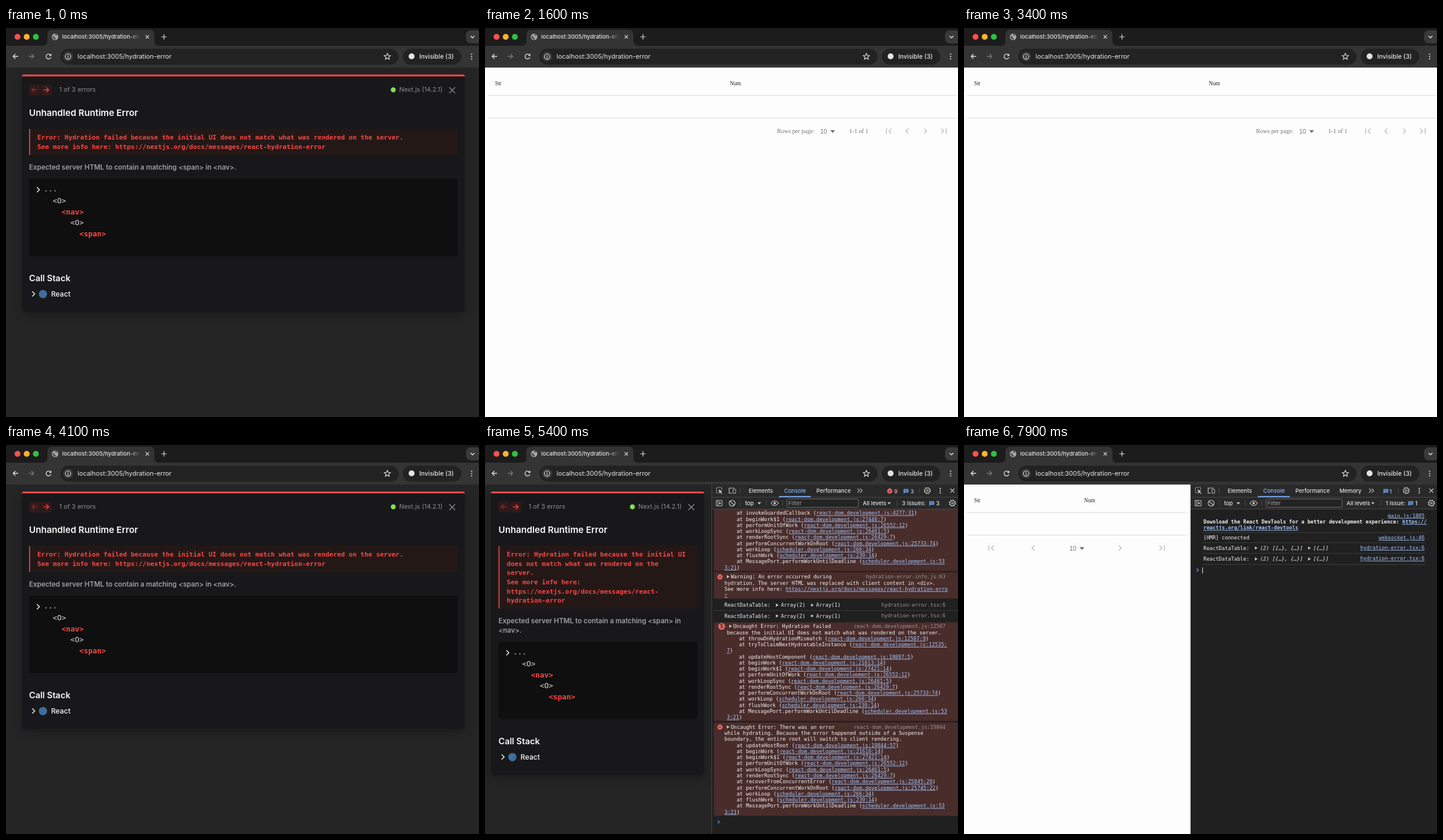
An HTML page for the animation above (8000 ms loop, 800 px wide and 659 px high).

```html
<!DOCTYPE html>
<html lang="en">
<head>
<meta charset="utf-8">
<title>Hydration error</title>
<style>
  html, body { margin: 0; width: 100%; height: 100%; overflow: hidden; background: #252526; }
  svg { display: block; width: 800px; height: 659px; }
  text { white-space: pre; font-family: Inter, Roboto, sans-serif; }
  .mono { font-family: "DejaVu Sans Mono", "Liberation Mono", monospace; }
  .serif { font-family: "Liberation Serif", "Noto Serif", serif; }
  .arial { font-family: "Liberation Sans", Inter, sans-serif; }
  .b { font-weight: 700; }
  .sb { font-weight: 600; }
  .md { font-weight: 500; }
  .i { font-style: italic; }
  .link { fill: #a6c6fa; text-decoration: underline; }
  .panel { filter: drop-shadow(0 5px 8px rgba(0, 0, 0, .28)); }
</style>
</head>
<body>
<svg id="stage" viewBox="0 0 800 659"></svg>
<script>
const LOOP = 8000, STEP = 100;
const RED = '#f94746', LIGHT = '#e3e3e3', PITCH = 10.27;

// Drawing helpers
const esc = s => s.replace(/</g, '&lt;').replace(/>/g, '&gt;');
const text = (x, y, s, size, fill, cls = '') =>
  `<text x="${x}" y="${y}" font-size="${size}" fill="${fill}" class="${cls}">${esc(s)}</text>`;
const rect = (x, y, w, h, fill, r = 0, extra = '') =>
  `<rect x="${x}" y="${y}" width="${w}" height="${h}" rx="${r}" fill="${fill}" ${extra}/>`;
const disc = (x, y, r, fill) => `<circle cx="${x}" cy="${y}" r="${r}" fill="${fill}"/>`;
const ring = (x, y, r, stroke, w = 1, extra = '') =>
  `<circle cx="${x}" cy="${y}" r="${r}" fill="none" stroke="${stroke}" stroke-width="${w}" ${extra}/>`;
const line = (d, stroke, w = 1, extra = '') =>
  `<path d="${d}" fill="none" stroke="${stroke}" stroke-width="${w}" ${extra}/>`;
const shape = (d, fill) => `<path d="${d}" fill="${fill}"/>`;
const group = (id, body) => `<g id="${id}">${body}</g>`;
const at = (x, y, body) => `<g transform="translate(${x} ${y})">${body}</g>`;
const cross = (x, y, r, stroke, w) =>
  line(`M${x - r} ${y - r}l${2 * r} ${2 * r}m0 ${-2 * r}l${-2 * r} ${2 * r}`, stroke, w);
const down = (x, y, fill, r = 3) => shape(`M${x - r} ${y - r / 2}h${2 * r}l${-r} ${r * 1.25}z`, fill);
const right = (x, y) => shape(`M${x - 2} ${y - 2.7}l4.6 2.7l-4.6 2.7z`, '#c4c4c4');
const dots = (x, y, gap) => [-gap, 0, gap].map(d => disc(x, y + d, 1.1, LIGHT)).join('');

// Browser frame
function browser() {
  const arrow = (x, s, c) => line(`M${x + 4.5 * s} 48H${x - 4 * s}m${4 * s} -4l${-4 * s} 4l${4 * s} 4`, c, 1.3);
  const star = Array.from({ length: 10 }, (_, i) => {
    const a = i * Math.PI / 5, r = i % 2 ? 2.5 : 5.6;
    return `${(645 + r * Math.sin(a)).toFixed(2)},${(48.5 - r * Math.cos(a)).toFixed(2)}`;
  }).join(' ');
  return rect(0, 0, 800, 31, '#1c1c1d') +
    shape('M62 30Q70 30 70 22V12Q70 3 79 3H243Q251 3 251 12V22Q251 30 259 30z', '#343435') +
    rect(0, 30, 800, 37, '#343435') +
    disc(19.5, 15, 5, '#f9504f') + disc(35, 15, 5, '#fcb32c') + disc(50.5, 15, 5, '#2fc142') +
    group('globe', disc(83, 15, 5.5, '#a6a8ab') +
      shape('M78.6 13l3 1.2l.6 2.3l2 .8l-.8 2.6q-4-1-4.8-6.9zM83 10.2l4 1.4l-1.6 1.5l-2.2-.6z', '#47484a')) +
    group('spinner', disc(83, 15, 3, '#8b8d91') + ring(83, 15, 5, '#58606d', 1.3) +
      group('arc', line('M83 10A5 5 0 0 1 88 15A5 5 0 0 1 83 20', '#8ab4f8', 1.4))) +
    text(95, 18.4, 'localhost:3005/hydration-error', 9.55, 'url(#tabFade)', 'md') +
    cross(239, 15, 2.8, '#dedede', 1.2) +
    line('M262.7 15h9M267.2 10.5v9', '#dedede', 1.2) +
    rect(778, 4, 26, 22, '#3a3a3b', 8) + line('M785.8 13.5l3.2 3.2l3.2-3.2', LIGHT, 1.4) +
    arrow(16, 1, LIGHT) + arrow(43, -1, '#77787a') +
    group('reload', line('M75.2 45.5A4.2 4.2 0 1 0 76 49.6', LIGHT, 1.3) + shape('M76.6 43.3v4h-4z', LIGHT)) +
    group('stop', cross(72, 48, 3.4, LIGHT, 1.3)) +
    rect(92, 35, 572, 27, '#222223', 13.5) + disc(105, 48.3, 8.5, '#373738') +
    ring(105, 48.3, 4.6, LIGHT, 1.1) + line('M105 47.7v3M105 45.5v1.2', LIGHT, 1.2) +
    text(121, 52.2, 'localhost:3005/hydration-error', 10.9, '#e8e8e8') +
    `<polygon points="${star}" fill="none" stroke="${LIGHT}" stroke-width="1.1"/>` +
    rect(671, 35, 99, 27, '#222223', 13.5) + disc(686, 48, 5, LIGHT) +
    text(699, 52, 'Invisible (3)', 10.5, '#e8e8e8', 'md') +
    dots(787.5, 48.3, 4);
}

// Runtime error panel; narrow when the dev tools are docked
function errorPanel(narrow) {
  const dx = narrow ? -16.2 : 0, dy = narrow ? 78 : 0, cut = narrow ? -405.7 : 0;
  const x = narrow ? 10 : 27, w = narrow ? 361 : 749;
  const bx = 39 + dx, bw = narrow ? 336 : 725;
  const message = narrow
    ? ['Error: Hydration failed because the initial UI', 'does not match what was rendered on the', 'server.',
       'See more info here:', 'https://nextjs.org/docs/messages/react-', 'hydration-error']
    : ['Error: Hydration failed because the initial UI does not match what was rendered on the server.',
       'See more info here: https://nextjs.org/docs/messages/react-hydration-error'];
  const hint = narrow
    ? ['Expected server HTML to contain a matching <span> in', '<nav>.']
    : ['Expected server HTML to contain a matching <span> in <nav>.'];
  const tree = ['<O>', '<nav>', '<O>', '<span>'];
  return rect(0, 67, narrow ? 383 : 800, 592, '#252526') +
    rect(x, 78.7, w, 402.5 + dy, '#18181a', 5, 'class="panel"') +
    shape(`M${x} 81.9Q${x} 78.7 ${x + 4} 78.7H${x + w - 4}Q${x + w} 78.7 ${x + w} 81.9z`, RED) +
    at(dx, 0,
      rect(39, 96, 18.6, 18, '#321a1b', 3) + rect(58.4, 96, 18.6, 18, '#321a1b', 3) +
      line('M52.5 104.7h-8.5m3.8 -4l-4 4l4 4', '#8c2f31', 1.2) +
      line('M63.5 104.7h8.5m-3.8 -4l4 4l-4 4', '#ff4a4a', 1.3) +
      text(90, 108.4, '1 of 3 errors', 10.9, '#8e8e92') +
      text(39, 148.8, 'Unhandled Runtime Error', 15.2, '#fafafa', 'sb')) +
    at(cut, 0, disc(655, 104.7, 4.2, '#83e053') +
      text(665, 108.4, 'Next.js (14.2.1)', 10.8, '#8e8e92') + cross(754.7, 105.3, 5, '#a2a2a5', 1.2)) +
    rect(bx, 171, bw, narrow ? 106 : 44, '#241817') + rect(bx, 171, 1.8, narrow ? 106 : 44, '#dc4444') +
    message.map((s, i) => text(53 + dx, 189.2 + i * 15.6, s, 10.94, RED, 'mono b')).join('') +
    hint.map((s, i) => text(bx, (narrow ? 302 : 239.6) + i * 15.6, s, 11.52, '#a0a0a3', 'sb')).join('') +
    rect(bx, 255 + dy, bw, 131.5, '#0f0f10', 3) +
    at(dx, dy,
      line('M52.3 269.7l4.3 4.3l-4.3 4.3', '#f0f0f0', 1.5) +
      text(64, 276.8, '...', 12.46, '#8e8e92', 'mono b') +
      tree.map((s, i) => text(79 + i * 15, 296.8 + i * 18.75, s, 12.46,
        i % 2 ? RED : '#d8d8da', i % 2 ? 'mono b' : 'mono')).join('') +
      text(39, 428.8, 'Call Stack', 14.5, '#fafafa', 'sb') +
      line('M44.3 446.2l4.3 4.3l-4.3 4.3', '#f0f0f0', 1.5) +
      disc(62.5, 450.7, 7, '#3f6d9f') +
      text(76.2, 455.3, 'React', 12.1, '#fafafa', 'md'));
}

// Data table page
function table(narrow) {
  const gray = '#757575', end = narrow ? 376 : 798;
  const chevron = 'M15.41 7.41L14 6l-6 6 6 6 1.41-1.41L10.83 12z';
  const edge = 'M18.41 16.59L13.82 12l4.59-4.59L17 6l-6 6 6 6zM6 6h2v12H6z';
  const icon = (x, d, flip) =>
    `<path transform="translate(${x} 174.8) scale(${flip * .78} .78) translate(-12 -12)" d="${d}" fill="#c3c3c3"/>`;
  const xs = narrow ? [46, 117, 264, 335] : [683, 714, 745, 776];
  const dx = narrow ? -388.5 : 0;
  return rect(0, 67, narrow ? 383 : 800, 592, '#fdfdfd') +
    text(17, 97, 'Str', 9.4, '#222', 'serif') + text(narrow ? 203 : 414, 97, 'Num', 9.4, '#222', 'serif') +
    line(`M5 114.3H${end}M5 152.6H${end}`, '#dadada') +
    (narrow ? '' : text(494, 178.4, 'Rows per page:', 10.2, gray, 'serif') +
      text(616, 178.4, '1-1 of 1', 10.2, gray, 'serif')) +
    text(567 + dx, 178.8, '10', 10.2, gray, 'arial') + down(588 + dx, 175, gray, 4) +
    icon(xs[0], edge, 1) + icon(xs[1], chevron, 1) + icon(xs[2], chevron, -1) + icon(xs[3], edge, -1);
}

// Dev tools
const ICON = '#c7c7c7', ALERT = '#492d2b';
const label = (x, y, s, fill = LIGHT) => text(x, y, s, 9.38, fill, 'md');
const gear = (x, y) => ring(x, y, 4.3, ICON, 1.2) + ring(x, y, 1.5, ICON, 1.1) +
  ring(x, y, 5.3, ICON, 1.2, 'stroke-dasharray="2.08 2.08"');
const bubble = (x, y) => shape(`M${x - 4} ${y - 3.5}h8v6h-6l-2 2z`, '#6c9ff0') +
  line(`M${x - 2.3} ${y - 1.7}h4.6m-4.6 2h4.6`, '#28292b', .8);
const sep = (x, y) => line(`M${x} ${y - 5}v10`, '#4b4b4c');
const badge = (x, y, r = 4.4) => disc(x, y, r, '#e46962');

function toolbar() {
  return rect(383, 67, 417, 592, '#202021') + rect(384, 67, 416, 41, '#29292a') +
    line('M383.5 67V659', '#454546') + line('M384 88.5H800M384 108.5H800', '#464647') +
    line('M395 81h-3.5v-9h9v3', ICON, 1, 'stroke-dasharray="2 1.2"') +
    shape('M395 75.5l6.5 2.5l-2.7 1.2l2.6 2.7l-1 1l-2.6-2.7l-1 2.4z', ICON) +
    line('M413 80.5v-7.5h9M412 81.5h5.5', ICON, 1.2) + rect(419.5, 75, 4.5, 7, 'none', 1, `stroke="${ICON}"`) +
    sep(431.5, 77) + label(446, 80.5, 'Elements') + label(506, 80.5, 'Console', '#8ab4f8') +
    label(560.5, 80.5, 'Performance') + rect(497, 86.5, 54, 2, '#7cacf8') +
    gear(748, 77.3) + dots(770, 77.3, 3.6) + cross(790.5, 77.3, 3.3, ICON, 1.2) +
    rect(391, 94, 10, 9, 'none', 0, `stroke="${ICON}"`) + line('M393.8 94v9', ICON) + shape('M396 96l3.5 2.5l-3.5 2.5z', ICON) +
    ring(418, 98.5, 5, ICON, 1.2) + line('M414.5 95l7 7', ICON, 1.2) + sep(431.5, 98.5) +
    label(440, 102, 'top') + down(464, 98.5, ICON) + sep(475.5, 98.5) +
    line('M483.7 98.5Q490 90.5 496.3 98.5Q490 106.5 483.7 98.5z', ICON, 1.2) + disc(490, 98.5, 2, ICON) +
    sep(503.5, 98.5) + gear(790.5, 98.5);
}

// end: right edge of the filter box; n: issue count
function status(end, issues, n, memory, errors) {
  const more = memory ? 689 : 634;
  return rect(510.5, 91.5, end - 511, 14, '#242425', 2.5, 'stroke="#6b6b6c"') +
    label(513, 102, 'Filter', '#8f8f90') + label(end + 7, 102, 'All levels') + down(end + 51.5, 98.3, ICON, 2.8) +
    sep(end + 65, 98.5) + label(end + 73.3, 102, issues) +
    (memory ? label(635, 80.5, 'Memory') : '') +
    line(`M${more - 4} 73.8l3.5 3.5l-3.5 3.5m4.5-7l3.5 3.5l-3.5 3.5`, ICON, 1.1) +
    (n ? bubble(755.5, 98.7) + label(763, 102, n) : '') +
    (n ? bubble(errors ? 712 : 713.5, 78) + label(719.5, 81.5, n, '#a9c5f5') : '') +
    (errors ? badge(684.5, 78) + cross(684.5, 78, 1.5, '#29292a', 1) + label(692, 81.5, errors, '#f0a09b') : '') +
    (n ? sep(735, 77) : '');
}

// Text between underscores becomes a link
const mono = (x, y, s, cls = '', fill = '#f2f0ef') => text(x, y, s, 8.6, fill, 'mono ' + cls)
  .replace(/_(.+?)_/g, '<tspan class="link">$1</tspan>');
const source = (y, s, dim) =>
  mono(779 - s.length * 5.177, y, dim ? s : `_${s}_`, '', '#9b9493');
const lines = (x, y, list) => list.map((s, i) => mono(x, y + i * PITCH, s)).join('');
const frame = (name, pos, file = 'react-dom') => `    at ${name} (_${file}.development.js:${pos}_)`;
const WORK = [frame('performUnitOfWork', '26552:12'), frame('workLoopSync', '26461:5'), frame('renderRootSync', '26429:7')];
const TAIL = [frame('workLoop', '266:34', 'scheduler'), frame('flushWork', '239:14', 'scheduler'),
  '    at MessagePort.performWorkUntilDeadline (_scheduler.development.js:53_', '_3:21_)'];
const ROOT = frame('performConcurrentWorkOnRoot', '25733:74');
const prompt = y => line(`M393.5 ${y - 2.6}l3 2.6l-3 2.6`, '#5f97f2', 1.2);

function errorLog() {
  const block = (y, h) => rect(387, y, 413, h, ALERT, 2);
  const mark = y => badge(397.5, y) + cross(397.5, y, 1.6, ALERT, 1);
  const row = y => mono(405, y + 3, 'ReactDataTable:') + right(494, y) + mono(500.5, y + 3, 'Array(2)') +
    right(553.5, y) + mono(560, y + 3, 'Array(1)') + source(y + 2.5, 'hydration-error.tsx:6', true);
  return block(109, 104.5) + block(215.5, 44.5) + block(300.5, 167) + block(470, 158) +
    lines(405, 118.3, [frame('invokeGuardedCallback', '4277:31'), frame('beginWork$1', '27446:7'), ...WORK, ROOT, ...TAIL]) +
    mark(223.5) + right(411, 223) + mono(415.7, 226, 'Warning: An error occurred during') +
    source(226, 'hydration-error-info.js:63', true) +
    lines(405, 236.6, ['hydration. The server HTML was replaced with client content in <div>.',
      'See more info here: _https://nextjs.org/docs/messages/react-hydration-erro_', '_r_']) +
    row(271.3) + line('M387 280.5H800', '#39393a') + row(289.6) +
    badge(400.3, 307.3, 5.8) + text(397.8, 310.4, '5', 8.4, '#2c1b1a', 'sb') + right(415, 307) +
    mono(419.7, 310, 'Uncaught Error: Hydration failed') + source(310, 'react-dom.development.js:12507', true) +
    lines(409, 320.5, ['because the initial UI does not match what was rendered on the server.',
      frame('throwOnHydrationMismatch', '12507:9'),
      '    at tryToClaimNextHydratableInstance (_react-dom.development.js:12535:_', '_7_)',
      frame('updateHostComponent', '19897:5'), frame('beginWork', '21613:14'), frame('beginWork$1', '27421:14'),
      ...WORK, ROOT, ...TAIL]) +
    mark(478) + right(411, 477.7) + mono(415.7, 480.8, 'Uncaught Error: There was an error') +
    source(480.8, 'react-dom.development.js:19844', true) +
    lines(405, 491.1, ['while hydrating. Because the error happened outside of a Suspense',
      'boundary, the entire root will switch to client rendering.',
      frame('updateHostRoot', '19844:57'), frame('beginWork', '21610:14'), frame('beginWork$1', '27421:14'), ...WORK,
      frame('recoverFromConcurrentError', '25845:20'), frame('performConcurrentWorkOnRoot', '25745:22'), ...TAIL]) +
    prompt(638.5);
}

function download() {
  return source(122.7, 'main.js:1805') +
    mono(405, 133, 'Download the React DevTools for a better development experience: _https://_', 'b') +
    mono(405, 143.3, '_reactjs.org/link/react-devtools_', 'b');
}

function freshLog() {
  const row = y => mono(405, y + 3, 'ReactDataTable:') + right(494, y) + mono(500.7, y + 3, '(2) [{…}, {…}]', 'i') +
    right(584, y) + mono(590.7, y + 3, '[{…}]', 'i') + source(y + 2.3, 'hydration-error.tsx:6');
  return line('M403 148.5H780M403 165.5H780M403 183.5H780M403 202.5H780', '#3c3c3d') +
    mono(405, 160, '[HMR] connected') + source(160, 'websocket.js:46') +
    row(174.6) + row(193) + prompt(211.7);
}

document.getElementById('stage').innerHTML =
  `<defs><linearGradient id="tabFade" gradientUnits="userSpaceOnUse" x1="95" x2="227" y1="0" y2="0">
    <stop offset=".86" stop-color="#e3e3e3"/><stop offset="1" stop-color="#e3e3e3" stop-opacity="0"/>
  </linearGradient></defs>` +
  group('wideError', errorPanel(false)) + group('wideTable', table(false)) +
  group('slimError', errorPanel(true)) + group('slimTable', table(true)) +
  group('tools', toolbar()) +
  group('statusErrors', status(632, '3 Issues:', '3', false, '9')) +
  group('statusNone', status(651, 'No Issues', '', true)) +
  group('statusOne', status(640, '1 Issue:', '1', true)) +
  group('errorLog', errorLog()) + group('emptyLog', prompt(118)) +
  group('download', download()) + group('firstPrompt', prompt(157.8)) +
  group('freshLog', freshLog()) + group('caret', rect(403, 207.5, 1, 10, '#e8e8e8')) +
  browser();

const parts = Object.fromEntries([...document.querySelectorAll('#stage g[id]')].map(g => [g.id, g]));
const show = (id, on) => parts[id].setAttribute('display', on ? 'inline' : 'none');

function draw(ms) {
  const t = Math.floor(ms / STEP) * STEP;
  const within = (a, b) => t >= a && t < b;
  const docked = t >= 4400;
  const white = within(1300, 1800) || within(3100, 3600) || t >= 7000;
  const loading = within(1000, 1400) || within(2800, 3200) || within(6300, 7300);
  const errors = within(4700, 6300), fresh = t >= 7300;

  show('wideError', !docked && !white);
  show('wideTable', !docked && white);
  show('slimError', docked && !white);
  show('slimTable', docked && white);
  show('tools', docked);
  show('statusErrors', errors);
  show('statusNone', docked && !errors && !fresh);
  show('statusOne', fresh);
  show('errorLog', errors);
  show('emptyLog', within(4400, 4700) || within(6300, 6400));
  show('download', t >= 6400);
  show('firstPrompt', within(6400, 7300));
  show('freshLog', fresh);
  show('caret', t >= 7900);
  show('globe', !loading);
  show('reload', !loading);
  show('spinner', loading);
  show('stop', loading);
  parts.arc.setAttribute('transform', `rotate(${t * .36 % 360} 83 15)`);
}

function tick() {
  draw(performance.now() % LOOP);
  requestAnimationFrame(tick);
}
tick();
</script>
</body>
</html>
```
